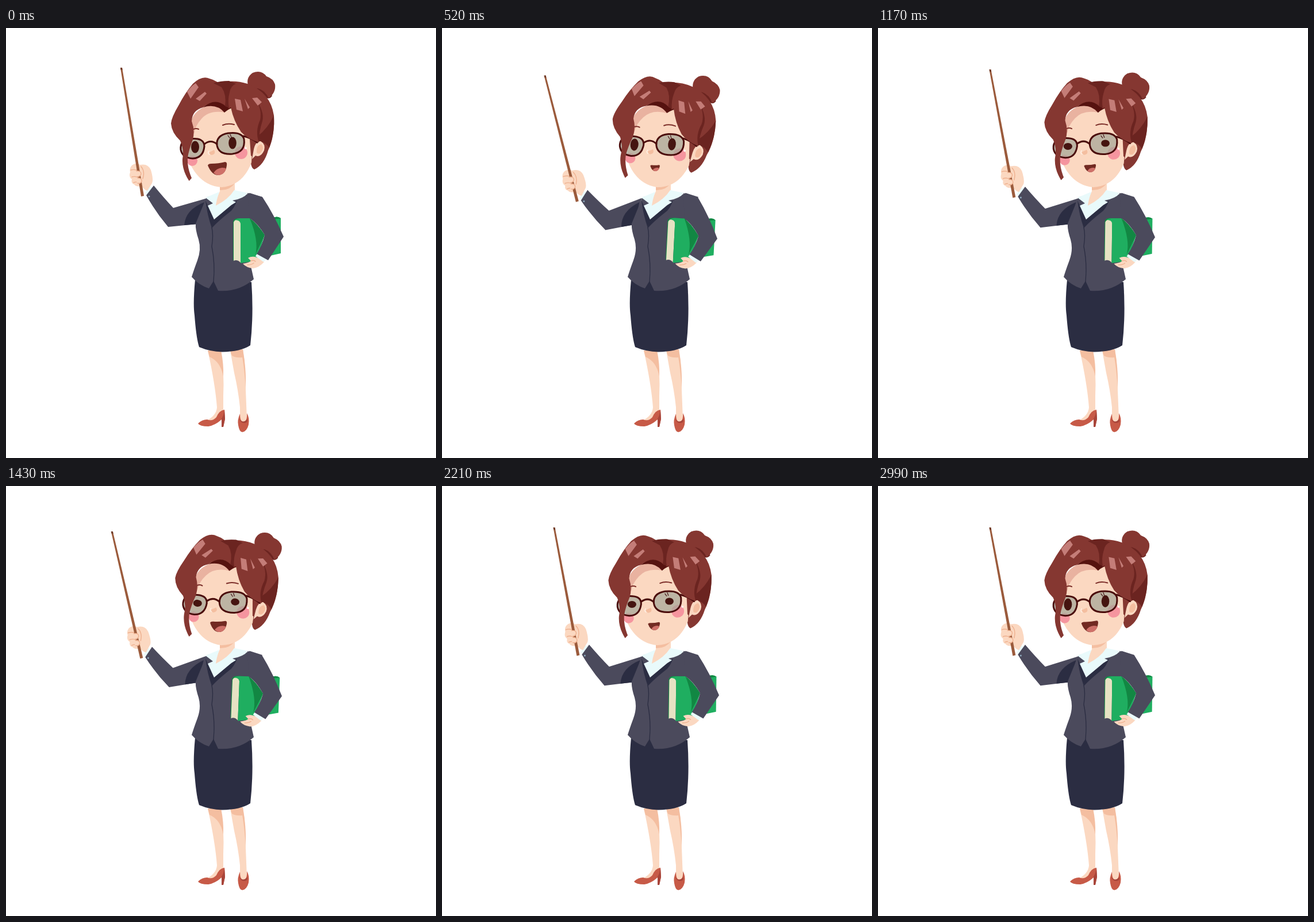
An HTML page for the animation above (3.12 s loop, 748 px wide and 748 px high).

```html
<!DOCTYPE html>
<html lang="en">
<head>
<meta charset="utf-8">
<title>Teacher with pointer</title>
<style>
html, body { margin: 0; height: 100%; overflow: hidden; background: #fff; }
svg { display: block; width: 100vw; height: 100vh; }
.hair { fill: #853731; } .hairDark { fill: #6b2420; } .shine { fill: #c47d78; }
.skin { fill: #fbd8c1; } .shade { fill: #f4bea0; } .blush { fill: #f5959f; }
.suit { fill: #4b4a5c; } .navy { fill: #2b2d42; } .shirt { fill: #e9fafb; }
.green { fill: #1fae60; } .greenDark { fill: #128743; }
.shoe { fill: #c75a47; } .shoeDark { fill: #a8453a; }
.line { fill: none; stroke-linecap: round; stroke-linejoin: round; }
.frame { stroke: #4b0d0c; stroke-width: 3; }
.fold { stroke: #eeb08f; stroke-width: 1.4; }
.brow { stroke: #7b2d28; stroke-width: 2; }
</style>
</head>
<body>
<svg viewBox="0 0 748 748">
  <g id="legs">
    <path class="skin" d="M351 561H374Q380 600 378 640V668Q365 685 349 683Q366 674 367 660Q364 620 351 561Z"/>
    <path class="shade" d="M351 561H374Q379 585 378 606Q373 580 354 572Z"/>
    <path class="shoe" d="M334 688Q341 681 350 681Q359 685 366 677Q371 665 380 664L381 680L378 694H375V681Q364 691 352 693Q337 693 334 688Z"/>
    <path class="shoeDark" d="M380 664L381 680L378 694H375V680Q379 673 380 664Z"/>
    <path class="skin" d="M390 561L412 559Q418 600 417 630L419 680Q417 687 407 684L407 660Q404 630 397 600Z"/>
    <path class="shade" d="M390 561L412 559Q418 592 417 625Q414 588 411 573Q400 574 393 570Z"/>
    <path class="shoe" d="M407 671Q402 682 404 691Q406 703 411 703Q419 702 422 690Q424 678 419 670Q420 684 413 685Q407 685 407 671Z"/>
    <path class="shoeDark" d="M406 680Q412 689 420 680Q421 686 416 687Q408 688 406 680Z"/>
  </g>
  <path class="navy" d="M329 438Q325 480 328 500Q331 540 336 555Q355 563 376 563.500Q408 563 425 552Q431 500 427 442Z"/>

  <g id="pointerArm">
    <path class="shirt" d="M249 275L256 278L247 292L242 287Z"/>
    <path class="suit" d="M350 296L291 313Q275 296 257 274L244 291Q260 320 282 346L332 341Z"/>
    <path class="navy" d="M345 303Q312 316 310 343L334 341Z"/>
    <circle cx="249" cy="293" r="1.5" fill="#8fa9bd"/>
    <path class="skin" d="M222 237Q229 234 233 238Q247 235 252 247Q257 264 254 270L246 283Q241 282 236 275Q226 277 223 272Q217 270 219 263Q213 259 216 251Q214 241 222 237Z"/>
    <path class="line fold" d="M217 247Q225 245 232 249M219 259Q226 257 233 261M222 269Q229 266 235 271M235 241Q242 249 238 262"/>
    <path fill="#9b5b3c" d="M199 69L202 69L240 292L235 293Z"/>
    <path fill="#6f3a28" d="M199 69L202 69L202.6 73L199.7 73Z"/>
    <path class="skin" d="M222 249Q229 247 234 250Q237 257 231 259Q224 260 222 249ZM225 261Q231 259 235 262Q238 268 232 271Q226 270 225 261Z"/>
    <path class="line fold" d="M227 249Q235 248 235 254Q234 258 228 259M229 261Q237 261 236 267Q234 271 229 270"/>
  </g>

  <path class="suit" d="M348 296L330 340Q329 350 335 368Q340 385 333 404Q327 420 323 433Q335 447 353 453L361 440L369 457Q404 460 431 437L425 410V330L446 294L424 287Q400 300 352 293Z"/>
  <path class="navy" d="M347 300L351 309L362 333L393 306L402 300Q396 316 388 321Q370 335 358 348Q350 325 347 300Z"/>
  <path class="line" stroke="#2b2d42" stroke-width="1.3" d="M358 347Q361 360 358 380Q364 410 361 441"/>
  <path class="skin" d="M372 265V284Q363 302 362 320L398 284V262Z"/>
  <path class="shade" d="M372 268V282Q389 283 398 270V262Z"/>
  <path class="shirt" d="M347 295L371 285Q366 300 365 309Q387 298 397 282L421 287Q413 297 394 300L400 303L392 308L362 333L351 309L360 305Z"/>

  <g id="bookArm">
    <path class="green" d="M462 331Q472 326 478 331V392L460 396Z"/>
    <path class="greenDark" d="M462 331Q472 326 478 331L465 333Z"/>
    <path class="greenDark" d="M395 406V337Q396 331 404 331H424L430 336L410 350Z"/>
    <path fill="#e6e2c3" d="M396 405V338Q398 333 403 334Q408 335 408 340V408Q402 402 396 405Z"/>
    <path class="green" d="M398 334Q402 331 407 331H424Q437 340 450 360L436 405L408 409V340Q407 334 398 334Z"/>
    <path class="greenDark" d="M424 331Q437 340 450 360L434 394Q440 370 424 331Z"/>
    <path class="skin" d="M449 407Q440 417 430 418Q418 417 412 410Q424 408 426 405L421 400Q428 396 436 399L446 402Z"/>
    <path class="line fold" d="M426 405Q431 403 434 406M420 412Q427 412 431 409"/>
    <path class="shirt" d="M438 391L434 397L448 407L453 402Z"/>
    <path class="suit" d="M420 287L446 294Q466 324 483 363L456 404L436 393Q445 380 450 360Q438 340 424 331Z"/>
  </g>

  <g id="head">
    <path class="hairDark" d="M425 100L448 120Q458 126 463 118L450 96Z"/>
    <path class="hair" d="M422 103Q416 87 429 78Q444 72 453 84Q465 88 468 98Q470 112 457 122Q450 108 438 105Q429 106 422 103Z"/>
    <path class="hair" d="M355 100Q390 87 420 97Q460 112 466 152Q468 188 456 213Q449 238 432 246Q423 243 427 215L400 150L360 140Z"/>
    <path class="hairDark" d="M466 152Q456 174 438 188L440 199Q449 196 458 208Q468 182 466 152Z"/>
    <path class="skin" d="M320 170Q330 140 360 134L398 138Q420 175 429 200L427 234Q412 274 375 277Q341 275 322 240Q314 215 320 170Z"/>
    <path fill="#e9b2a0" d="M321 178Q318 150 345 137Q366 130 381 147Q354 142 340 158Q329 170 327 184Z"/>
    <path class="hair" d="M424 193L441 198Q431 206 429 224L426 222Z"/>
    <path class="skin" d="M431 211Q434 197 443 197Q452 202 449 213Q443 226 434 222L428 228Z"/>
    <path class="shade" d="M436 217Q435 204 444 202Q450 208 444 216Q440 221 436 217Z"/>
    <circle class="blush" cx="409" cy="217" r="11"/>
    <circle class="blush" cx="324" cy="231" r="9"/>
    <path class="line brow" d="M326 176Q331 174 335 176M377 169Q386 165 397 168"/>
    <path class="shade" d="M362 212Q366 219 358 221Q353 220 354 216Z"/>
    <path class="line" stroke="#fff0e5" stroke-width="1.5" d="M353 214Q350 218 354 220"/>
    <g id="mouth">
      <path fill="#722a22" d="M351 239Q352 236 357 236Q370 236 381 233Q385 233 384 239Q382 255 369 256Q358 256 351 239Z"/>
      <path fill="#cf7169" d="M361 252Q366 244 376 243Q382 243 383 245Q379 256 369 256Q364 255 361 252Z"/>
    </g>
    <g fill="#a5a797" fill-opacity=".72">
      <path id="lensR" d="M367 204Q365 187 386 183Q410 180 414 193Q417 216 394 219Q370 221 367 204Z"/>
      <path id="lensL" d="M304 212Q302 196 320 193Q345 190 345 206Q343 226 325 227Q307 226 304 212Z"/>
    </g>
    <path class="line" stroke="#47191a" stroke-width="1.2" d="M389 191L386 187M392 190L390 185"/>
    <ellipse id="eyeL" cx="329" cy="207" rx="7" ry="10.500" fill="#451410"/>
    <ellipse id="eyeR" cx="394" cy="200" rx="6.800" ry="10.500" fill="#451410"/>
    <use href="#lensR" class="line frame"/>
    <use href="#lensL" class="line frame"/>
    <path class="line frame" d="M345 202Q356 193 367 202M413 188Q426 191 437 199"/>
    <circle cx="417" cy="209" r="1.8" fill="#fff"/>

    <path fill="#56120f" d="M343 138Q360 124 376 110L390 105L398 138Q389 139 380 147Q366 131 343 138Z"/>
    <path class="hair" d="M387 140Q384 110 394 100Q412 90 431 108Q444 118 446 132Q452 148 443 165Q437 180 440 199Q420 193 409 181Q396 162 391 138Z"/>
    <path class="hairDark" d="M434 124Q446 142 442 160Q433 180 440 199Q440 180 446 162Q450 145 434 124Z"/>
    <path class="hair" d="M287 166Q288 155 300 135Q312 112 325 97Q341 82 354 88Q370 92 375 103Q386 114 382 136Q364 120 343 138Q324 143 323 162Q329 178 325 194Q318 212 316 226Q315 243 323 261L318.500 266Q306 247 307 228Q310 211 303 196Q288 182 287 166Z"/>
    <path class="hairDark" d="M361 96Q372 92 388 92L400 97Q391 100 389 112Q385 126 388 139L381 136Q384 116 375 103Z"/>
    <path class="shine" d="M315 111Q322 101 330 96L335 103L321 123ZM330 123L346 111L349 114L337 127ZM398 123L408 125L412 145L401 142ZM415 123L424 138L421 141ZM428 122L437 121L445 129L438 135Z"/>
  </g>
</svg>
<script>
const STEP = 130, CYCLE = 8;
const part = id => document.getElementById(id);
const set = (id, value) => part(id).setAttribute('transform', value);
const rotate = (id, angle, x, y) => set(id, `rotate(${angle} ${x} ${y})`);
const scale = (id, sx, sy, x, y) =>
  set(id, `translate(${x} ${y}) scale(${sx} ${sy}) translate(${-x} ${-y})`);

// Linear interpolation through [position, value] pairs
function track(keys, at) {
  const i = keys.findIndex(key => key[0] > at);
  const [a, from] = keys[i - 1], [b, to] = keys[i];
  return from + (to - from) * (at - a) / (b - a);
}

const sway = [[0, 0], [4, 1], [8, 0]];
const blink = [[0, 1], [2, .15], [4, 1], [8, 1]];
const talk = [[0, 1], [4 / 3, .5], [8 / 3, 1], [4, .5], [16 / 3, 1], [7, .88], [8, 1]];

function draw(time) {
  const at = Math.floor(time / STEP) % CYCLE;
  const lean = track(sway, at), lid = track(blink, at), speech = track(talk, at);
  rotate('head', 5.5 * lean, 374, 264);
  rotate('pointerArm', -5 * lean, 345, 322);
  rotate('bookArm', 3 * lean, 415, 288);
  scale('mouth', speech, speech, 369, 243);
  scale('eyeL', 1 + (1 - lid) * .2, lid, 329, 207);
  scale('eyeR', 1 + (1 - lid) * .2, lid, 394, 200);
}

const start = performance.now();
(function loop() {
  draw(performance.now() - start);
  requestAnimationFrame(loop);
})();
</script>
</body>
</html>
```
